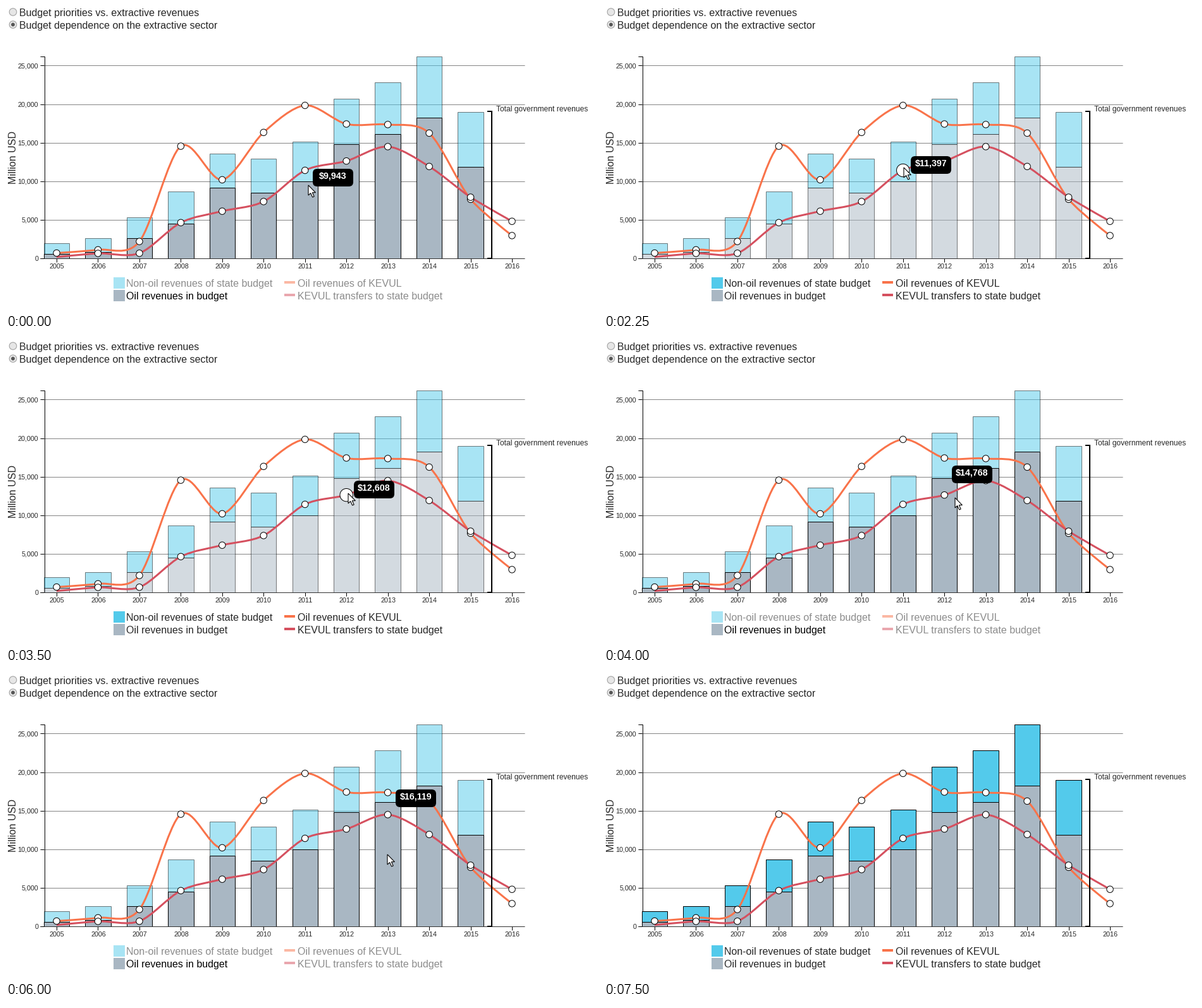
Animation, 936 px wide and 485 px high, one loop 7.75 s. Source, as a matplotlib script:

```python
import matplotlib.pyplot as plt
from matplotlib.animation import FuncAnimation
from matplotlib.patches import Circle, FancyBboxPatch, PathPatch, Polygon, Rectangle
from matplotlib.path import Path

W, H, DPI = 936, 485, 100
PT = 72 / DPI
STEP_MS, FRAMES = 250, 31

BLUE, GREY, ORANGE, RED = "#53caeb", "#a9b7c3", "#f9734a", "#d5505f"
INK = "#262626"
BASE_Y, UNIT = 400, 61.2 / 5000

# Values in million USD, 2005 to 2015 for bars and to 2016 for lines
TOTAL = [1980, 2580, 5330, 8640, 13570, 12880, 15141, 20680, 22810, 26150, 18920]
OIL = [570, 780, 2640, 4500, 9150, 8470, 9943, 14768, 16119, 18190, 11860]
FUND = [690, 1110, 2190, 14530, 10180, 16310, 19810, 17400, 17330, 16220, 7650, 2950]
TRANSFER = [180, 650, 670, 4630, 6110, 7360, 11397, 12608, 14470, 11900, 7920, 4800]

# Start time, hovered series, hovered year, pointer tip
TIMELINE = [
    (0, "oil", 2011, (478, 284)),
    (500, "other", 2011, (478, 272)),
    (750, "dot", 2011, (472, 255)),
    (1000, "dot", 2011, (481, 269)),
    (2250, "dot", 2011, (474, 256)),
    (2500, "dot", 2011, (481, 267)),
    (2750, "oil", 2012, (524, 262)),
    (3000, "dot", 2012, (543, 246)),
    (3250, "oil", 2012, (551, 257)),
    (3500, "dot", 2012, (541, 243)),
    (4000, "oil", 2012, (555, 250)),
    (4250, "oil", 2013, (590, 240)),
    (4500, "dot", 2013, (604, 222)),
    (5750, "dot", 2013, (605, 233)),
    (6000, "oil", 2013, (603, 286)),
    (6250, "oil", 2013, (603, 298)),
    (6750, "oil", 2013, (603, 348)),
    (7000, None, None, (534, 483)),
    (7250, None, None, None),
]

# The small margin keeps rounding from dropping a pixel row
fig = plt.figure(figsize=((W + 0.01) / DPI, (H + 0.01) / DPI), dpi=DPI,
                 facecolor="white")
ax = fig.add_axes([0, 0, 1, 1])
ax.set_xlim(0, W)
ax.set_ylim(H, 0)
ax.axis("off")


def x_of(year):
    return 80 + (year - 2005) * 720 / 11


def y_of(value):
    return BASE_Y - value * UNIT


def label(x, y, text, size=16, color=INK, z=5, **kw):
    return ax.text(x, y, text, fontsize=size * PT, color=color, zorder=z,
                   family="Liberation Sans", va="baseline", **kw)


def stroke(xs, ys, color="black", width=1, z=1):
    return ax.plot(xs, ys, color=color, lw=width * PT, zorder=z,
                   solid_capstyle="butt", solid_joinstyle="miter")[0]


def rect(x, y, w, h, color, edge="none", z=2):
    return ax.add_patch(Rectangle((x, y), w, h, fc=color, ec=edge, lw=PT, zorder=z))


def circle(x, y, r, color, edge="black", z=4):
    return ax.add_patch(Circle((x, y), r, fc=color, ec=edge, lw=PT, zorder=z))


def cardinal(points, k=0.15):
    """Cardinal spline with quadratic end segments."""
    tangents = [(k * (c[0] - a[0]), k * (c[1] - a[1]))
                for a, c in zip(points, points[2:])]

    def shifted(i, s):
        (x, y), (tx, ty) = points[i], tangents[i - 1]
        return x + s * tx, y + s * ty

    last = len(points) - 1
    verts = [points[0], shifted(1, -2 / 3), points[1]]
    codes = [Path.MOVETO, Path.CURVE3, Path.CURVE3]
    for i in range(1, last - 1):
        verts += [shifted(i, 1), shifted(i + 1, -1), points[i + 1]]
        codes += [Path.CURVE4] * 3
    verts += [shifted(last - 1, 2 / 3), points[last]]
    codes += [Path.CURVE3] * 2
    return Path(verts, codes)


def draw_radios():
    for y, text in ((9.5, "Budget priorities vs. extractive revenues"),
                    (29.5, "Budget dependence on the extractive sector")):
        circle(11, y, 5.8, "#e6e6e6", "#9c9c9c")
        label(21, y + 6.5, text)
    circle(11, 29.5, 2.9, "#555555", "none", 5)


def draw_axes():
    for value in range(0, 25001, 5000):
        y = y_of(value) + 0.5
        if value:
            stroke([60, 820], [y, y], "#858585")
        stroke([54, 60], [y, y])
        label(51, y + 3.5, f"{value:,}", 10.7, ha="right")
    stroke([54, 60.5, 60.5, 54], [80.5, 80.5, 400.5, 400.5])
    stroke([60, 820], [400.5, 400.5], "#333333", z=3)
    for year in range(2005, 2017):
        x = x_of(year)
        stroke([x, x], [400, 406])
        label(x + 0.5, 416, str(year), 10.7, ha="center")
    label(16, 240, "Million USD", ha="center", rotation=90, rotation_mode="anchor")


def draw_bars():
    oil, other = [], []
    for i, (total, part) in enumerate(zip(TOTAL, OIL)):
        left = x_of(2005 + i) - 20.2
        top, mid = y_of(total), y_of(part)
        other.append(rect(left, top, 40.4, mid - top, BLUE, "black"))
        oil.append(rect(left, mid, 40.4, BASE_Y - mid, GREY, "black"))
    return oil, other


def draw_line(values, color, z, first=0):
    points = [(x_of(2005 + i), y_of(v)) for i, v in enumerate(values)]
    ax.add_patch(PathPatch(cardinal(points), fc="none", ec=color, lw=3 * PT, zorder=z))
    return {2005 + i: circle(x, y, 5.2, "white", z=z + 0.5)
            for i, (x, y) in enumerate(points) if i >= first}


def draw_legend():
    entries = {}
    for key, x, y, color, text in (
            ("other", 170, 430, BLUE, "Non-oil revenues of state budget"),
            ("oil", 170, 450, GREY, "Oil revenues in budget"),
            ("fund", 440, 430, ORANGE, "Oil revenues of KEVUL"),
            ("transfer", 440, 450, RED, "KEVUL transfers to state budget")):
        if x == 170:
            mark = rect(x, y, 18, 18, color)
        else:
            mark = rect(x, y + 6, 17, 4, color)
        entries[key] = mark, label(190 if x == 170 else 461, y + 15, text)
    return entries


draw_radios()
draw_axes()
oil_bars, other_bars = draw_bars()
draw_line(FUND, ORANGE, 3.2)
dots = draw_line(TRANSFER, RED, 3.3, first=1)
legend = draw_legend()

stroke([761, 767.5, 767.5, 761], [167, 167, 400, 400], width=2, z=4)
label(775, 167, "Total government revenues", 12)

tip_box = FancyBboxPatch((0, 0), 64, 28, boxstyle="round,pad=0,rounding_size=7",
                         fc="black", ec="none", zorder=8)
ax.add_patch(tip_box)
tip_text = label(0, 0, "", 14.3, "white", 9, ha="center", weight="bold")

ARROW = [(0, 0), (0, 16), (3.7, 12.6), (6.6, 19), (9.2, 18), (6.4, 11.7), (11.4, 11.7)]
pointer = Polygon(ARROW, fc="white", ec="black", lw=1.1 * PT, zorder=10)
ax.add_patch(pointer)


def show_tooltip(series, year):
    visible = series is not None
    tip_box.set_visible(visible)
    tip_text.set_visible(visible)
    if not visible:
        return
    i = year - 2005
    if series == "dot":
        value, top = TRANSFER[i], y_of(TRANSFER[i]) - 23
    elif series == "oil":
        value, top = OIL[i], y_of(OIL[i]) - 20
    else:
        value, top = TOTAL[i] - OIL[i], y_of(TOTAL[i]) - 20
    left = round(x_of(year) + 12.3)
    tip_box.set_bounds(left, round(top), 64, 28)
    tip_text.set_position((left + 32, round(top) + 15))
    tip_text.set_text(f"${value:,}".replace("$", r"\$"))


def update(frame):
    now = frame * STEP_MS
    _, series, year, tip = [entry for entry in TIMELINE if entry[0] <= now][-1]

    for key, bars in (("oil", oil_bars), ("other", other_bars)):
        for bar in bars:
            bar.set_alpha(1 if series in (None, key) else 0.5)
    for key, (mark, text) in legend.items():
        on_bar = series in ("oil", "other")
        faded = on_bar and key != series
        mark.set_alpha(0.5 if faded else 1)
        text.set_color("#8c8c8c" if faded else "black" if on_bar else INK)
    for dot_year, dot in dots.items():
        dot.set_radius(10.2 if series == "dot" and dot_year == year else 5.2)

    show_tooltip(series, year)
    pointer.set_visible(tip is not None)
    if tip:
        pointer.set_xy([(tip[0] + dx, tip[1] + dy) for dx, dy in ARROW])
    return []


anim = FuncAnimation(fig, update, frames=FRAMES, interval=STEP_MS,
                     init_func=lambda: update(0), repeat=True, repeat_delay=0)
plt.show()
```
